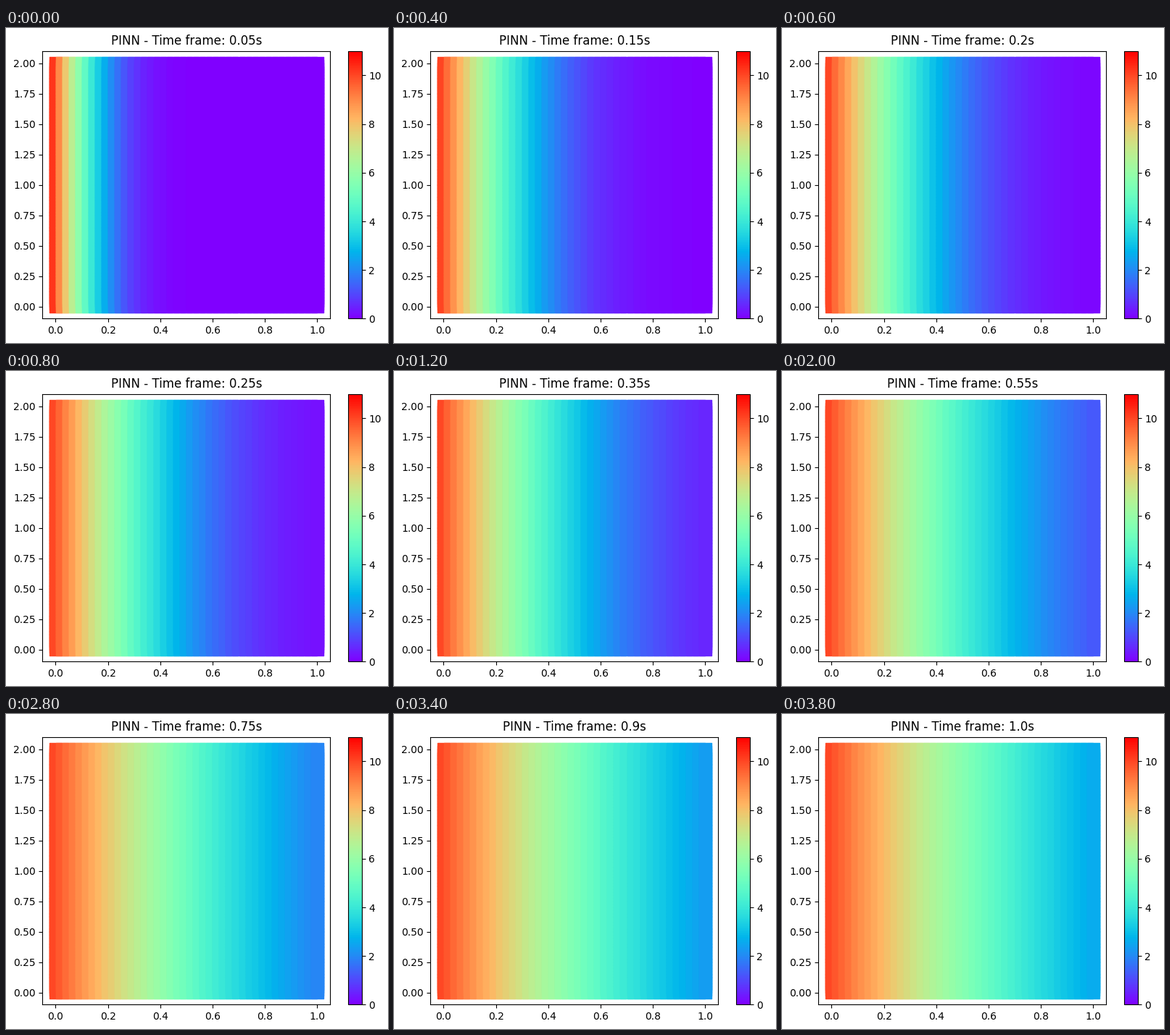
A matplotlib script that plays this animation: 527 by 435 pixels, repeating every 4000 ms.

```python
import math

import matplotlib.pyplot as plt
import numpy as np
from matplotlib.animation import FuncAnimation

W, H, DPI = 527, 435, 100
FRAMES, STEP = 20, 0.05
DIFFUSIVITY, LAG = 0.4, 0.01

erfc = np.vectorize(math.erfc)


def box(left, bottom, width, height):
    return [left / W, bottom / H, width / W, height / H]


def temperature(x, t):
    """Heat spreading from a hot wall at x = 0, with a brief early overshoot."""
    spread = 10 * erfc(x / (2 * math.sqrt(DIFFUSIVITY * (t - LAG))))
    return spread + 0.9 * math.exp(-t / 0.04) * np.exp(-x / 0.03)


# The tiny surplus keeps the pixel size from being truncated down.
fig = plt.figure(figsize=((W + 0.01) / DPI, (H + 0.01) / DPI), dpi=DPI,
                 facecolor="white")
ax = fig.add_axes(box(50.45, 33.6, 396.8, 369.6))
cax = fig.add_axes(box(472.05, 33.6, 18.48, 369.6))

# Columns run left to right, so each one overlaps the one before it.
xs, ys = np.meshgrid(np.linspace(0, 1, 41), np.linspace(0, 2, 81),
                     indexing="ij")
xs, ys = xs.ravel(), ys.ravel()
points = ax.scatter(xs, ys, c=temperature(xs, STEP), s=150, marker="s",
                    cmap="rainbow", vmin=0, vmax=11)
ax.set_xlim(-0.05, 1.05)
ax.set_ylim(-0.1, 2.1)
title = ax.set_title("")
fig.colorbar(points, cax=cax)


def update(i):
    t = round(STEP * (i + 1), 2)
    points.set_array(temperature(xs, t))
    title.set_text(f"PINN - Time frame: {t}s")
    return points, title


anim = FuncAnimation(fig, update, frames=FRAMES, interval=200, repeat=True,
                     repeat_delay=0, blit=False)
plt.show()
```
